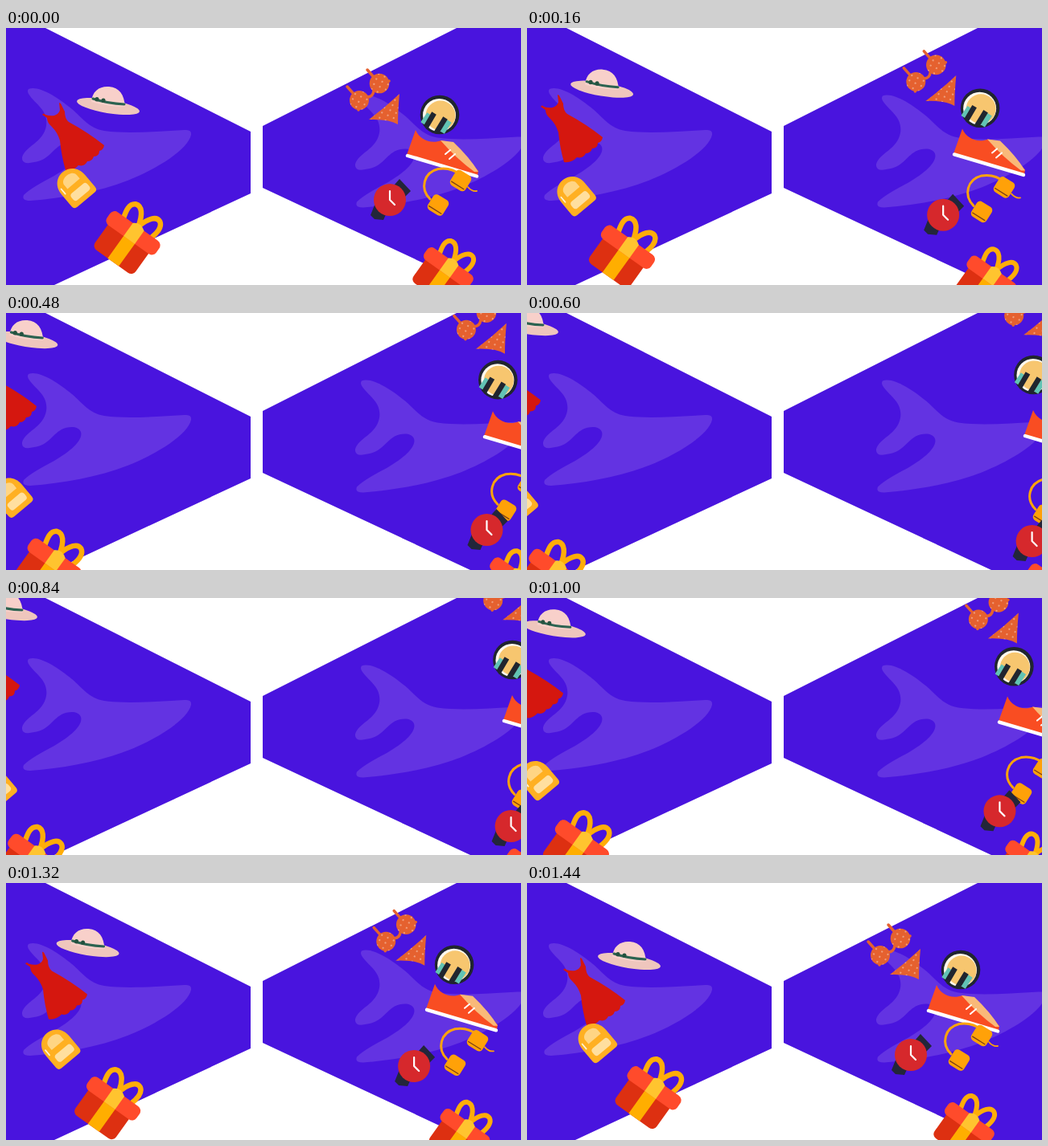
These frames come from a looping animation (640 px wide and 320 px high, 1.88 s). An HTML page:

```html
<!DOCTYPE html>
<html lang="en">
<head>
<meta charset="utf-8">
<title>Shopping items</title>
<style>
  html, body { margin: 0; width: 100%; height: 100%; overflow: hidden; background: #fff; }
  svg { display: block; width: 640px; height: 320px; }
  .line { fill: none; stroke-linecap: round; stroke-linejoin: round; }
</style>
</head>
<body>
<svg viewBox="0 0 640 320">
  <defs>
    <pattern id="dots" width="8" height="7" patternUnits="userSpaceOnUse" patternTransform="rotate(25)">
      <rect width="8" height="7" fill="#e5612f"/>
      <circle cx="4" cy="3" r=".8" fill="#ffe9dc"/>
    </pattern>
    <path id="blob" fill="#6333e2" d="M28 76C40 71 64 86 82 101C95 112 103 125 122 128C150 132 185 129 222 127Q231 126 230 133C226 151 189 175 151 190C115 204 70 212 30 215Q19 215 22 208C30 200 45 192 60 184C82 171 96 158 93 148C90 140 77 141 69 145C57 152 52 165 35 167Q19 171 20 161C24 147 46 143 50 122C53 102 36 95 28 82Q26 78 28 76Z"/>
    <g id="gift" transform="translate(151 262.5) rotate(35.5)">
      <rect x="-30" y="-8" width="62" height="42" rx="7" fill="#dd3011"/>
      <rect x="-6" y="-4" width="17" height="38" fill="#ffae00"/>
      <g class="line" stroke="#ffad08" stroke-width="6.5">
        <path d="M2 -20C-2 -36 -9 -44 -17 -41C-24 -37 -22 -28 -19 -18"/>
        <path d="M2 -20C6 -36 13 -44 20 -41C27 -37 26 -28 23 -18"/>
      </g>
      <rect x="-36" y="-20" width="75" height="20" rx="7" fill="#ff4b2b"/>
      <path d="M-6 0V-20Q2 -27 11 -20V0Z" fill="#ffc42f"/>
    </g>
    <g id="cup">
      <rect x="-11" y="-11" width="22" height="22" rx="5" fill="#ffa108"/>
      <path class="line" stroke="#7c3f16" stroke-width="1.3" d="M-9 7H9"/>
    </g>
  </defs>

  <path fill="#4914de" d="M0 0H49L304 129V206L60 320H0ZM640 0H560L319 122V199L577 320H640Z"/>
  <use href="#blob"/>
  <use href="#blob" x="414" y="8.5"/>

  <!-- data-step: x and y shift per tick -->
  <g data-step="-8.47 -5.33">
    <ellipse cx="127" cy="97.5" rx="39.5" ry="8.5" transform="rotate(9.5 127 97.5)" fill="#efc6bd"/>
    <path fill="#f8d0ca" d="M106 92C107 78 117 72 128 73C141 74 147 83 148 98Q126 98 106 92Z"/>
    <path class="line" stroke="#2c6351" stroke-width="3" d="M108 88Q126 94 147 95"/>
    <path class="line" stroke="#24523f" stroke-width="5" d="M113 88.5v.5M121 90v.5"/>
  </g>

  <g data-step="-7 -2.5">
    <path fill="#d5170f" d="M45 108Q47 105 49 108Q55 110 60 109Q66 107 67 102L66 93L68 94L73 104Q73 113 78 117Q102 130 122 146Q121 152 116 153Q116 160 109 160Q107 166 101 166Q98 173 90 171Q84 178 74 177Q69 160 67 140Q64 130 57 123Q51 118 51 112Z"/>
  </g>

  <g data-step="-6.55 2.55">
    <g transform="translate(86.5 198.5) rotate(-40)">
      <path fill="#ffb022" d="M-19 15V-4C-19 -32 19 -32 19 -4V15Q19 20 14 20H-14Q-19 20 -19 15Z"/>
      <path fill="#ffd584" d="M-9 -5V-11C-9 -21 11 -21 11 -11V-5Z"/>
      <rect x="-12" y="2.5" width="26" height="11" rx="4" fill="#ffdf9f"/>
      <path class="line" stroke="#fff4d8" stroke-width="1.7" d="M-15 -10V-2"/>
    </g>
  </g>

  <use href="#gift" data-step="-8.15 4.38"/>

  <g data-step="11.08 -5.78">
    <path class="line" stroke="#e5612f" stroke-width="3.5" d="M424 73L432 82M449 52L456 60M449 86Q456 86 457 78M472 67L476 66M438 99V102"/>
    <g fill="url(#dots)">
      <circle cx="439" cy="90" r="12"/>
      <circle cx="464" cy="69" r="12.3"/>
      <path d="M489 82Q471 99 451 114Q476 113 487 120Q487 103 489 82Z"/>
    </g>
  </g>

  <g data-step="6.03 -2.07">
    <circle cx="539" cy="108" r="24.3" fill="#20252f"/>
    <circle cx="538.5" cy="108.5" r="20.5" fill="#fffaf0"/>
    <circle cx="540" cy="109" r="18.5" fill="#f7c66f"/>
    <g fill="none" stroke-width="6.5">
      <path stroke="#62c3b4" d="M518 119L526 107M542 130L551 116"/>
      <path stroke="#20252f" d="M522 123L532 106M535 130L546 112"/>
    </g>
  </g>

  <g data-step="8 -.4">
    <path fill="#f94d22" d="M509 127C514 139 528 145 541 140L556 143L587 178L586 184L498 158Z"/>
    <path fill="#f9b979" d="M540 140L556 142Q576 161 587 179L582 179Q560 163 540 140Z"/>
    <path class="line" stroke="#fff" stroke-width="4.4" d="M499 159L585 184.5"/>
    <path class="line" stroke="#fff" stroke-width="2" d="M546 157L552 152M551 163L558 157"/>
  </g>

  <g data-step="7 2.1">
    <path class="line" stroke="#ffa30a" stroke-width="3" d="M527 213C514 200 519 180 537 175.5Q553 173 565 183"/>
    <path class="line" stroke="#ffa30a" stroke-width="1.8" d="M574 198Q579 204 585 203"/>
    <use href="#cup" transform="translate(537 220.5) rotate(32)"/>
    <use href="#cup" transform="translate(565 190) rotate(32)"/>
  </g>

  <g data-step="10.04 4.67">
    <path fill="#23263a" d="M482 196L489 188L503 203L495 211ZM459 218L453 233L458 238L469 239L473 230Z"/>
    <circle cx="477" cy="214" r="20" fill="#d6282c"/>
    <path class="line" stroke="#fff" stroke-width="2.2" d="M477 203V214L483 220"/>
  </g>

  <g data-step="6.85 2.6">
    <use href="#gift" transform="translate(404.5 63.3) scale(.92)"/>
  </g>
</svg>
<script>
  const LOOP = 1880, TICK = 40, TRAVEL = 16, RETURN_END = 36;
  const items = [...document.querySelectorAll('[data-step]')].map(el => ({
    el,
    step: el.dataset.step.split(' ').map(Number),
    base: el.getAttribute('transform') || ''
  }));

  // Linear out, short hold, linear back, long hold.
  function draw(now) {
    const tick = Math.floor(now % LOOP / TICK);
    const pos = Math.max(0, Math.min(tick, TRAVEL, RETURN_END - tick));
    for (const { el, step: [dx, dy], base } of items) {
      el.setAttribute('transform', `translate(${dx * pos} ${dy * pos}) ${base}`);
    }
  }

  const start = performance.now();
  function loop() {
    draw(performance.now() - start);
    requestAnimationFrame(loop);
  }
  loop();
</script>
</body>
</html>
```
